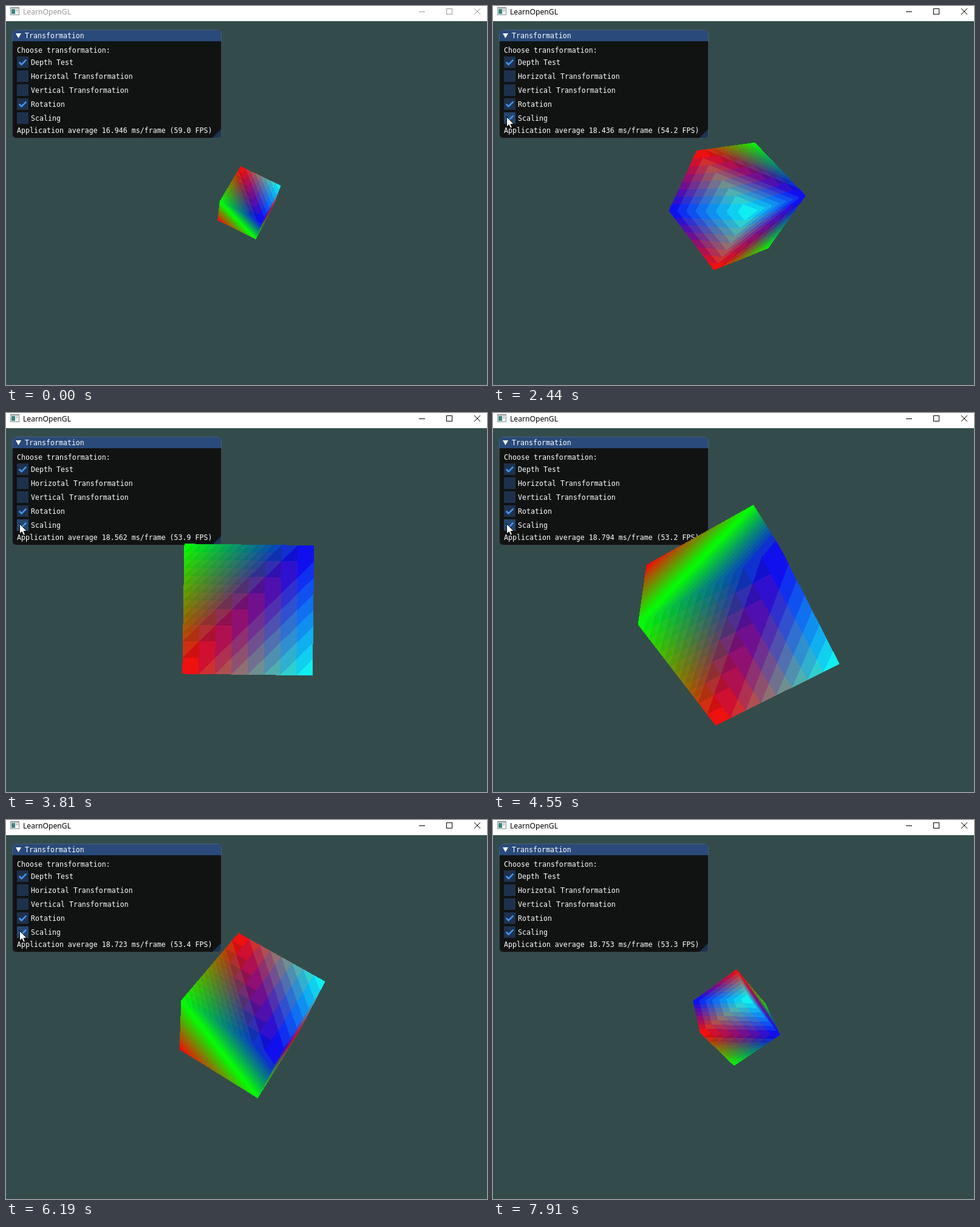
These frames come from a looping animation (792 by 624 pixels, 7.99 s). An HTML page with a canvas:

```html
<!DOCTYPE html>
<html lang="en">
<head>
<meta charset="utf-8">
<title>LearnOpenGL</title>
<style>
  html, body { margin: 0; width: 100%; height: 100%; overflow: hidden; background: #334c4b; }
  canvas { display: block; }
</style>
</head>
<body>
<canvas id="stage" width="792" height="624"></canvas>
<script>
const LOOP = 7990;
const FOCUS_AT = 310, CHECK_AT = 905, LEAVE_AT = 7690;
const ctx = document.getElementById('stage').getContext('2d');

const lerp = (a, b, k) => a + (b - a) * Math.min(1, Math.max(0, k));

// Constant spin; size grows steadily to a peak and shrinks again
const angleAt = t => Math.PI + 0.995 * (t - 3830) / 1000;
const scaleAt = t => Math.max(1, 3.03 - 0.54 * Math.abs(t - 4650) / 1000);

// Key points of the frame time readout: [time, ms per frame]
const READOUT = [[0, 16.945], [1400, 18.175], [2440, 18.436], [3810, 18.562],
  [5260, 19.016], [6190, 18.723], [7910, 18.753]];

function frameMsAt(t) {
  const next = READOUT.findIndex(key => key[0] > t);
  if (next < 0) return READOUT[READOUT.length - 1][1];
  const [t0, a] = READOUT[next - 1], [t1, b] = READOUT[next];
  return lerp(a, b, (t - t0) / (t1 - t0));
}

function cursorAt(t) {
  if (t < 230 || t >= LEAVE_AT) return null;
  if (t >= CHECK_AT) return [22, 182];
  const k = (t - 230) / 600;
  return [lerp(40, 10, k), lerp(406, 170, k)];
}

// Cube corners (lower case = bottom) with their colours
const RED = [1, 0, 0], GREEN = [0, 1, 0], BLUE = [0, 0, 1], CYAN = [0, 1, 1];
const CORNERS = {
  A: [1, 1, 1, CYAN], a: [1, -1, 1, BLUE],
  B: [-1, 1, -1, BLUE], b: [-1, -1, -1, RED],
  C: [1, 1, -1, RED], c: [1, -1, -1, GREEN],
  D: [-1, 1, 1, RED], d: [-1, -1, 1, GREEN]
};
// Outward counter-clockwise triangles; colour levels where green is low, and elsewhere
const TRIANGLES = [['DaA', 8, 8], ['aCA', 8, 8], ['BAC', 8, 8], ['BDA', 8, 8],
  ['Dda', 8, 16], ['acC', 8, 16], ['dca', 8, 16], ['dbc', 32, 32]];

const SIZE = 420, LEFT = 189, TOP = 115;
const CX = 399 - LEFT, CY = 325 - TOP;
const FOCAL = 300 / Math.tan(Math.PI / 8), DISTANCE = 20;
const layer = document.createElement('canvas');
layer.width = layer.height = SIZE;
const layerCtx = layer.getContext('2d');
const image = layerCtx.createImageData(SIZE, SIZE);

// Rotate about the axis (1, 0, 1), then project
function project([x, y, z, color], angle, scale) {
  const cos = Math.cos(angle), sin = Math.sin(angle);
  const p = (x + z) * Math.SQRT1_2, q = (x - z) * Math.SQRT1_2;
  const turned = q * cos - y * sin;
  const w = 1 / (DISTANCE - scale * (p - turned) * Math.SQRT1_2);
  const k = FOCAL * scale * w;
  return {
    x: CX + k * (p + turned) * Math.SQRT1_2,
    y: CY - k * (y * cos + q * sin),
    w, color
  };
}

const side = (a, b, x, y) => (b.x - a.x) * (y - a.y) - (x - a.x) * (b.y - a.y);

function fillTriangle(a, b, c, low, high) {
  const area = side(a, b, c.x, c.y);
  if (area >= 0) return;
  const span = key => {
    const v = [a[key], b[key], c[key]];
    return [Math.max(0, Math.floor(Math.min(...v))), Math.min(SIZE - 1, Math.ceil(Math.max(...v)))];
  };
  const [x0, x1] = span('x'), [y0, y1] = span('y');
  for (let y = y0; y <= y1; y++) {
    for (let x = x0; x <= x1; x++) {
      const px = x + 0.5, py = y + 0.5;
      let u = side(b, c, px, py) / area, v = side(c, a, px, py) / area;
      let s = 1 - u - v;
      if (u < -1e-6 || v < -1e-6 || s < -1e-6) continue;
      u *= a.w; v *= b.w; s *= c.w;
      const sum = u + v + s, at = (y * SIZE + x) * 4;
      const mix = i => (u * a.color[i] + v * b.color[i] + s * c.color[i]) / sum;
      const levels = mix(1) < 0.25 ? low : high;
      for (let i = 0; i < 3; i++) {
        const band = Math.min(levels - 1, Math.floor(mix(i) * levels + 1e-6));
        image.data[at + i] = 255 * (band + 0.5) / levels;
      }
      image.data[at + 3] = 255;
    }
  }
}

function drawCube(t) {
  const angle = angleAt(t), scale = scaleAt(t), points = {};
  for (const key in CORNERS) points[key] = project(CORNERS[key], angle, scale);
  image.data.fill(0);
  for (const [keys, low, high] of TRIANGLES) {
    fillTriangle(...[...keys].map(k => points[k]), low, high);
  }
  layerCtx.putImageData(image, 0, 0);
  ctx.drawImage(layer, LEFT, TOP);
}

function rect(x, y, w, h, color) {
  ctx.fillStyle = color;
  ctx.fillRect(x, y, w, h);
}

function shape(points, fill, stroke, width = 1) {
  ctx.beginPath();
  points.forEach(([x, y]) => ctx.lineTo(x, y));
  if (fill) {
    ctx.closePath();
    ctx.fillStyle = fill;
    ctx.fill();
  }
  if (stroke) {
    ctx.strokeStyle = stroke;
    ctx.lineWidth = width;
    ctx.stroke();
  }
}

function label(text, x, y) {
  ctx.font = '11.627px "DejaVu Sans Mono", monospace';
  ctx.fillStyle = '#fff';
  ctx.fillText(text, x, y);
}

function drawTitleBar(active) {
  const ink = active ? '#000' : '#999';
  rect(0, 0, 792, 25, '#fff');
  rect(7, 2, 15, 13, '#8a9296');
  rect(8, 4, 13, 10, '#f4f6f6');
  rect(9, 5, 6, 8, '#3d8580');
  rect(16, 5, 4, 4, '#c9d3d6');
  ctx.font = '12.15px "Noto Sans", "Open Sans", sans-serif';
  ctx.fillStyle = ink;
  ctx.fillText('LearnOpenGL', 28, 14);
  rect(680, 9, 10, 1, ink);
  ctx.strokeStyle = ink;
  ctx.lineWidth = 1;
  ctx.strokeRect(725.5, 4.5, 9, 9);
  shape([[771, 4], [781, 14]], null, ink);
  shape([[781, 4], [771, 14]], null, ink);
}

function checkbox(text, y, checked, hover) {
  rect(18, y, 19, 19, hover ? '#24466e' : '#1e314c');
  if (checked) {
    shape([[21.65, y + 9.5], [25.55, y + 13.4], [33.35, y + 5.6]], null, '#4296fa', 2.6);
  }
  label(text, 41, y + 14);
}

function drawPanel(t, hover) {
  ctx.save();
  ctx.beginPath();
  ctx.roundRect(10, 39, 345, 179, 7);
  ctx.clip();
  rect(10, 39, 345, 179, '#111313');
  rect(10, 39, 345, 19, '#294a7a');
  shape([[355, 202], [355, 218], [339, 218]], '#1d3450');
  ctx.restore();
  ctx.strokeStyle = 'rgba(110,110,128,.5)';
  ctx.lineWidth = 1;
  ctx.beginPath();
  ctx.roundRect(10.5, 39.5, 344, 178, 6.5);
  ctx.stroke();

  shape([[16, 45], [25, 45], [20.5, 53]], '#fff');
  label('Transformation', 31, 53);
  label('Choose transformation:', 18, 77);
  const options = ['Depth Test', 'Horizotal Transformation', 'Vertical Transformation', 'Rotation', 'Scaling'];
  const checked = [true, false, false, true, t >= CHECK_AT];
  options.forEach((text, i) => checkbox(text, 83 + 23 * i, checked[i], hover && i === 4));
  const ms = frameMsAt(t);
  label(`Application average ${ms.toFixed(3)} ms/frame (${(1000 / ms).toFixed(1)} FPS)`, 18, 209);
}

function drawCursor([x, y]) {
  const arrow = [[0, 0], [0, 16.5], [3.8, 13], [6.3, 18.8], [9, 17.6], [6.6, 12], [11.8, 12], [0, 0]];
  shape(arrow.map(([dx, dy]) => [x + 0.5 + dx, y + 0.5 + dy]), '#fff', '#000');
}

function draw(t) {
  const cursor = cursorAt(t);
  rect(0, 0, 792, 624, '#334c4b');
  drawTitleBar(t >= FOCUS_AT);
  drawPanel(t, cursor && t >= CHECK_AT);
  drawCube(t);
  if (cursor) drawCursor(cursor);
}

const start = performance.now();
function tick() {
  draw((performance.now() - start) % LOOP);
  requestAnimationFrame(tick);
}
tick();
</script>
</body>
</html>
```
